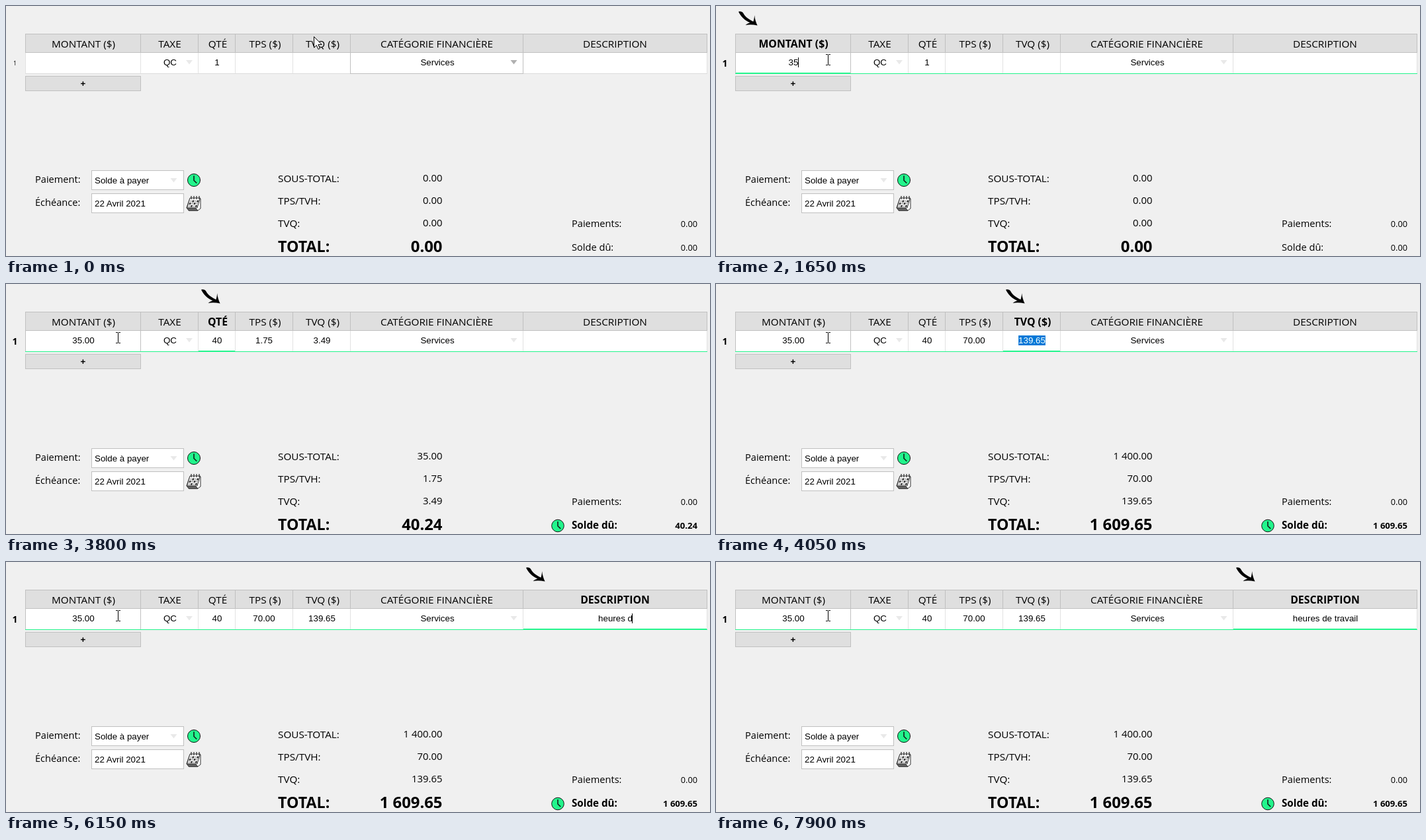
An HTML page that plays this animation: 1064x379 px, repeating every 8000 ms.

```html
<!DOCTYPE html>
<html lang="fr">
<head>
<meta charset="utf-8">
<title>Facture</title>
<style>
  html, body { margin: 0; width: 100%; height: 100%; overflow: hidden; background: #f0f0f0; }
  svg { display: block; }
  text { white-space: pre; fill: #000; }
  .ui { font-family: "Open Sans", "Noto Sans", sans-serif; font-size: 15.3px; }
  .low { font-size: 14.6px; }
  .num { font-size: 14.9px; }
  .small { font-size: 12.7px; }
  .big { font-size: 23.9px; font-weight: 700; }
  .field { font-family: "Liberation Sans", Arial, sans-serif; font-size: 13.333px; }
  .bold { font-weight: 700; }
  .head.bold { font-size: 15.8px; }
  .low.bold { font-size: 15.2px; }
  .small.bold { font-size: 13.1px; }
</style>
</head>
<body>
<script>
const LOOP = 8000, STEP = 50;
const GREEN = '#22f58c', LINE = '#c0c0c0', PALE = '#e2e2e2', MARK = '#e9e9e9';

function add(parent, tag, attrs = {}, content) {
  const el = document.createElementNS('http://www.w3.org/2000/svg', tag);
  for (const key in attrs) el.setAttribute(key, attrs[key]);
  if (content !== undefined) el.textContent = content;
  parent.appendChild(el);
  return el;
}

const svg = add(document.body, 'svg', { width: 1064, height: 379, viewBox: '0 0 1064 379' });
const rect = (x, y, width, height, fill, parent = svg) =>
  add(parent, 'rect', { x, y, width, height, fill });
const text = (x, y, cls, content, anchor = 'start') =>
  add(svg, 'text', { x, y, class: cls, 'text-anchor': anchor }, content);
const path = (d, fill, extra = {}, parent = svg) => add(parent, 'path', { d, fill, ...extra });
const box = (x, y, w, h, fill, stroke = LINE) =>
  add(svg, 'rect', { x: x + .5, y: y + .5, width: w - 1, height: h - 1, fill, stroke });
const triangle = (x, y, fill) => path(`M${x - 5} ${y - 3}h10l-5 6.5z`, fill);
const show = (el, on) => el.setAttribute('visibility', on ? 'visible' : 'hidden');

function clock(cx, cy, r) {
  const g = add(svg, 'g', { stroke: '#111' });
  add(g, 'circle', { cx, cy, r, fill: GREEN });
  path(`M${cx} ${cy - r * .7}v${r * .75}l${r * .45} ${r * .42}`, 'none', { 'stroke-width': 1.5 }, g);
  return g;
}

function calendar(x, y) {
  const g = add(svg, 'g', { transform: `translate(${x} ${y})`, stroke: '#333' });
  path('M5 4H21V19L17 22H3Z', '#fff', {}, g);
  path('M5 4L0 18H13L17 22H3L0 18Z', '#666', {}, g);
  path('M5 3H20.5L16 18H.5Z', '#fff', {}, g);
  for (let row = 0; row < 3; row++)
    for (let col = 0; col < 4; col++)
      path(`M${5.4 + col * 3.5 - row * 1.2} ${6.5 + row * 3.7}h2.7l-.9 2.9h-2.7z`,
        (row + col) % 2 ? '#333' : '#bbb', { stroke: 'none' }, g);
  for (let i = 0; i < 4; i++) path(`M${7 + i * 4} 5V0`, 'none', { 'stroke-width': 1.3 }, g);
}

// Table: header, header centre, text centre
const EDGES = [29, 203, 290, 346, 433, 520, 781, 1059];
const COLS = [
  ['MONTANT ($)', 117, 117], ['TAXE', 247.5, 248], ['QTÉ', 320, 319], ['TPS ($)', 391.5, 390],
  ['TVQ ($)', 478.5, 477.5], ['CATÉGORIE FINANCIÈRE', 651, 652], ['DESCRIPTION', 920.5, 921],
];

rect(29, 42, 1031, 29, '#dfdfdf');
rect(29, 71, 1031, 32, '#fff');
rect(29, 102, 1031, 1, '#dcdcdc');
for (const x of EDGES) {
  rect(x, 42, 1, 29, LINE);
  rect(x, 71, 1, 31, PALE);
}
rect(29, 42, 1031, 1, LINE);
rect(29, 70, 1031, 1, LINE);

const hoverCategory = box(520, 70, 262, 33, 'none');
const hoverAmount = box(29, 70, 175, 33, 'none');
const rowLine = rect(29, 102, 1031, 1, GREEN);
const focusLine = rect(0, 101, 1, 1, GREEN);
triangle(277, 85, MARK);
const categoryMark = triangle(767.5, 85, MARK);

const selection = rect(0, 78, 1, 15, '#0078d7');
const heads = COLS.map(c => text(c[1], 63, 'ui head', c[0], 'middle'));
const cells = COLS.map(c => text(c[2], 90, 'field', '', 'middle'));
const caret = rect(0, 78, 1, 15, '#000');
const rowNumber = text(13.5, 90, 'ui', '1', 'middle');

box(29, 106, 175, 23, '#dfdfdf');
text(116.5, 122, 'field bold', '+', 'middle');

// Payment block
text(44, 268, 'ui low', 'Paiement:');
text(44, 303, 'ui low', 'Échéance:');
box(129, 249, 140, 30, '#fff');
box(129, 284, 140, 30, '#fff');
text(134, 269, 'field', 'Solde à payer');
text(134, 304, 'field', '22 Avril 2021');
triangle(253.5, 264, MARK);
clock(284, 264, 9.5);
calendar(273, 288);

// Totals
['SOUS-TOTAL:', 'TPS/TVH:', 'TVQ:'].forEach((s, i) => text(411, 267 + i * 34, 'ui', s));
text(411, 373, 'ui big', 'TOTAL:').style.fontSize = '23.2px';
const sums = [0, 1, 2, 3].map(i =>
  text(659.5, i < 3 ? 266 + i * 34 : 373, i < 3 ? 'ui num' : 'ui big', '', 'end'));
text(855, 335, 'ui low', 'Paiements:');
text(1045, 335, 'ui small', '0.00', 'end');
const dueLabel = text(855, 371, 'ui low', 'Solde dû:');
const due = text(1045, 371, 'ui small', '', 'end');
const dueClock = clock(834, 366.5, 9.3);

const pointer = add(svg, 'g');
path('M0 .8C3 -.4 6 .6 7.6 3.6C10.5 9 16 12.5 24 16.5L22.5 19C13 16.5 5 11 0 .8Z' +
  'M24.2 6C24.6 11 26.4 17 28.6 21.5C22 20.2 16 20 10.5 21C14 18 18 16.8 22 16.6C23.3 13.5 23.8 10 24.2 6Z',
  '#000', {}, pointer);
const arrow = add(svg, 'g');
path('M0 0V16.5L3.8 13L6.4 19L9 17.9L6.4 12H11.7Z', '#fff', { stroke: '#000' }, arrow);
const beam = add(svg, 'g');
path('M-3.5 -8h3M.5 -8h3M0 -7.5v15M-3.5 8h3M.5 8h3', 'none', { stroke: '#000' }, beam);

// Timelines: [start in ms, value]
const typed = (s, starts) => starts.map(([t, n]) => [t, s.slice(0, n)]);
const VALUES = [
  [[0, ''], [1400, '3'], [1650, '35'], [2050, '35.00']],
  [[0, 'QC']],
  [[0, '1'], [3200, '4'], [3250, '40']],
  [[0, ''], [2100, '1.75'], [3850, '70.00']],
  [[0, ''], [2100, '3.49'], [3850, '139.65']],
  [[0, 'Services']],
  typed('heures de travail', [[0, 0], [5400, 1], [5500, 2], [5600, 3], [5650, 4], [5750, 5],
    [6000, 6], [6050, 7], [6150, 8], [6300, 9], [6400, 10], [6550, 12],
    [6750, 13], [6850, 14], [6950, 15], [7200, 16], [7400, 17]]),
];
const FOCUS = [[0, -1], [550, 0], [2050, 2], [3850, 3], [4050, 4], [4350, 5], [4600, 6]];
const CARET = [[0, 0], [550, 1], [1050, 0], [1400, 1], [2050, 0], [3200, 1], [3800, 0],
  [4600, 1], [5150, 0], [5400, 1], [7900, 0]];
const SELECTED = [[0, 0], [2050, 1], [3200, 0], [3850, 1], [4350, 0]];
const SUMS = [
  [0, ['0.00', '0.00', '0.00', '0.00']],
  [2100, ['35.00', '1.75', '3.49', '40.24']],
  [3850, ['1 400.00', '70.00', '139.65', '1 609.65']],
];

const at = (table, t) => table.reduce((v, [start, value]) => t >= start ? value : v, table[0][1]);
const ease = p => p * p * (3 - 2 * p);
const part = (t, from, to) => ease(Math.min(1, Math.max(0, (t - from) / (to - from))));

function drawMouse(t) {
  const move = part(t, 0, 450), drift = part(t, 500, 800);
  const x = Math.round(465 - 297 * move + drift) + .5;
  const y = Math.round(46 + 33 * move + 2 * drift) + .5;
  const inField = y > 71 && x < 204;
  show(arrow, !inField);
  show(beam, inField);
  show(hoverAmount, inField);
  show(hoverCategory, t < STEP);
  categoryMark.setAttribute('fill', t < STEP ? '#b0b0b0' : MARK);
  (inField ? beam : arrow).setAttribute('transform', `translate(${x} ${y})`);
}

function drawRow(t) {
  const focus = at(FOCUS, t), active = focus >= 0;
  cells.forEach((cell, i) => {
    cell.textContent = at(VALUES[i], t);
    cell.style.fill = i === focus && at(SELECTED, t) ? '#fff' : '#000';
  });
  heads.forEach((head, i) => head.classList.toggle('bold', i === focus));
  rowNumber.classList.toggle('bold', active);
  rowNumber.style.fontSize = active ? '14px' : '9px';
  rowNumber.setAttribute('y', active ? 91.5 : 90);
  [rowLine, focusLine, pointer].forEach(el => show(el, active));
  show(caret, active && at(CARET, t));
  show(selection, active && at(SELECTED, t));
  if (!active) return;

  const left = EDGES[focus], centre = COLS[focus][2];
  const width = cells[focus].textContent ? cells[focus].getComputedTextLength() : 0;
  pointer.setAttribute('transform', `translate(${left + 5} 8)`);
  focusLine.setAttribute('x', left + 1);
  focusLine.setAttribute('width', EDGES[focus + 1] - left - 1);
  caret.setAttribute('x', Math.floor(centre + width / 2));
  selection.setAttribute('x', centre - width / 2);
  selection.setAttribute('width', width);
}

function drawTotals(t) {
  const values = at(SUMS, t), owed = values[3] !== '0.00';
  sums.forEach((el, i) => el.textContent = values[i]);
  due.textContent = values[3];
  due.classList.toggle('bold', owed);
  dueLabel.classList.toggle('bold', owed);
  show(dueClock, owed);
}

let last = -1;
const origin = performance.now();
function frame() {
  const elapsed = (performance.now() - origin) % LOOP;
  const t = Math.floor(elapsed / STEP) * STEP;
  if (t !== last) {
    last = t;
    drawMouse(t);
    drawRow(t);
    drawTotals(t);
  }
  requestAnimationFrame(frame);
}
frame();
</script>
</body>
</html>
```
